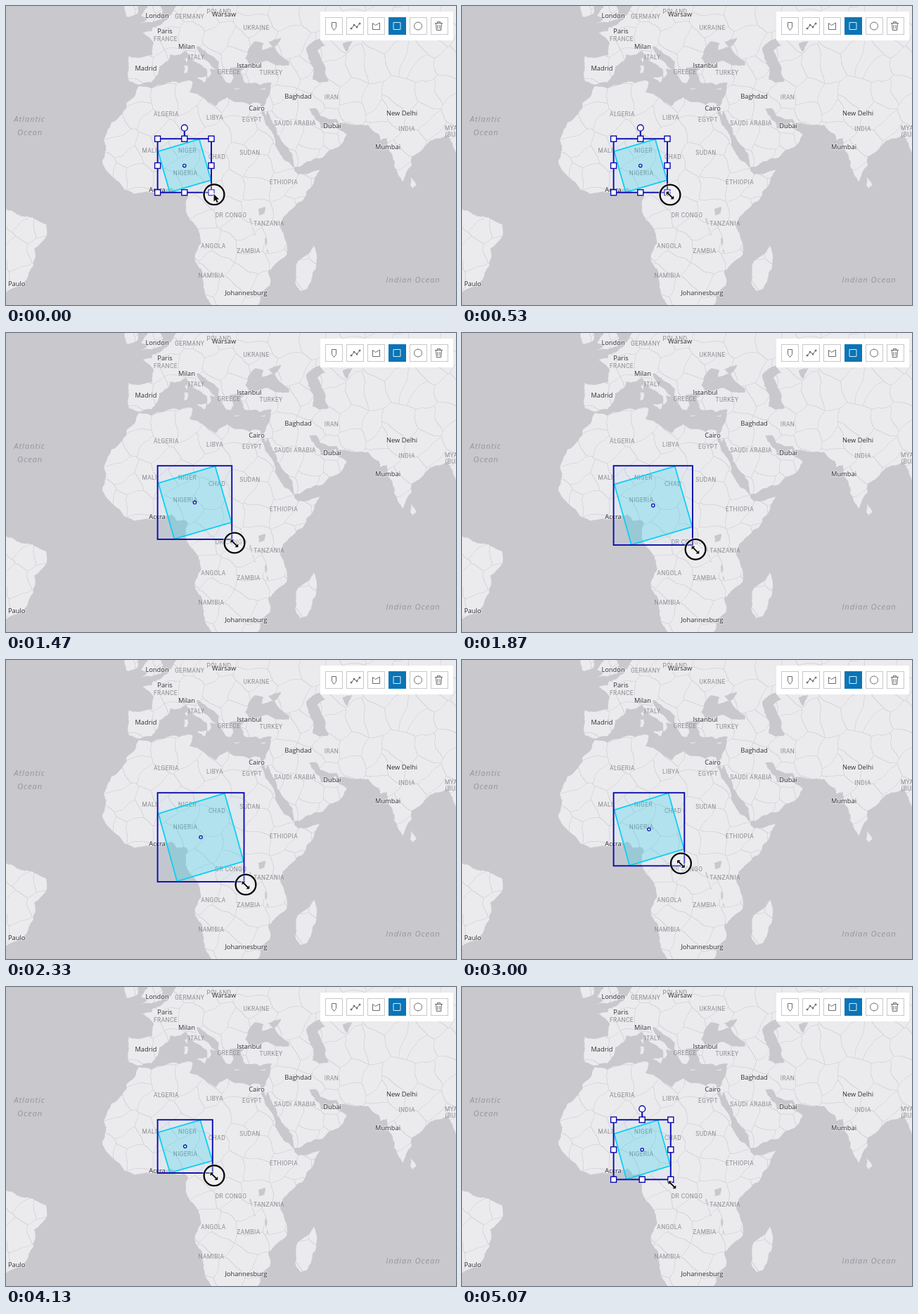
An HTML page with a canvas that plays this animation: 640x426 px, repeating every 5.14 s.

```html
<!DOCTYPE html>
<html lang="en">
<head>
<meta charset="utf-8">
<title>Resizing a shape on a map</title>
<style>
html, body { margin: 0; width: 640px; height: 426px; overflow: hidden; background: #c9c8cd; }
canvas { display: block; }
</style>
</head>
<body>
<canvas id="stage" width="640" height="426"></canvas>
<script>
const SEA = '#c9c8cd', LAND = '#ebeaed', BORDER = '#d9d8dc', BLUE = '#0b0baf';
const LOOP = 5140, STEP = 1000 / 15;

const stage = document.getElementById('stage').getContext('2d');
const base = document.createElement('canvas');
base.width = 640;
base.height = 426;
const map = base.getContext('2d');

const hash = n => {
  const s = Math.sin(n * 127.1 + 3) * 43758.5453;
  return s - Math.floor(s);
};
let seed = 0;
const random = () => hash(++seed);

// Web Mercator
const project = pair => {
  const [lon, lat] = pair.split(',').map(Number);
  return [215.5 + lon * 4.5, 287 - 257.8 * Math.log(Math.tan(Math.PI / 4 + lat * Math.PI / 360))];
};

// A line with a few seeded bends, like a coast
function coast([ax, ay], [bx, by]) {
  if (Math.hypot(bx - ax, by - ay) < 4) return map.lineTo(bx, by);
  const push = (random() - .5) * .22;
  const mid = [(ax + bx) / 2 + (by - ay) * push, (ay + by) / 2 - (bx - ax) * push];
  coast([ax, ay], mid);
  coast(mid, [bx, by]);
}
function area(outline, color = LAND) {
  const points = outline.trim().split(/\s+/).map(project);
  map.beginPath();
  points.forEach((p, i) => coast(p, points[(i + 1) % points.length]));
  map.fillStyle = color;
  map.fill();
}

function drawLand() {
  // Africa
  area(`-6,35.8 -2,35.2 4,36.8 10,37.3 11,37 10.2,34.2 15,32.4 18.5,30.5 20,32 22,32.9 25,31.6 29,30.9 31,31.5
    32.5,31.2 32.6,30 35.5,24 37.2,21 37.3,19 39.7,15.2 43.2,12.5 43.3,11.5 44.5,10.4 51.2,11.9 49,7 46,2.3
    42.5,-.5 40.2,-2.6 38.8,-6 40.6,-10.7 40.7,-15 35,-19.8 35.5,-24 32.8,-25.7 32.5,-28 30,-31 18,-31
    15,-26.5 14.4,-22.5 11.8,-16 13.8,-11 12.3,-6 8.9,-1 9.7,3.5 8.5,4.6 6,4.3 4.4,6.3 1,6 -2,4.8 -7.5,4.4
    -13,8.5 -16.7,12.5 -17.4,14.7 -16.2,19 -17,21 -14.5,26 -9.8,30 -9.8,31.4 -6.8,34`);
  area('49.3,-12 50.4,-15.7 47.2,-25 45,-25.5 43.5,-23 44.2,-17 47,-15');
  // Europe
  area(`-9.2,43.2 -9.4,38.7 -8.9,37 -6,36.2 -2,36.8 0,38.7 .5,40.7 3.2,42 4,43.5 7,43.5 9,44.4 10.4,43 12.3,41.7
    15.6,40 15.8,38 17,39 16.6,40.2 18.4,40 16,41.8 13.5,43.6 12.3,45.3 13.7,45.6 20,55 8.5,55 4.5,52.2
    1.5,50.2 -1.5,49.4 -1.8,48.6 -4.7,48.3 -1.2,46 -1.6,43.4`);
  area(`12,46 15,44.4 19.4,41.8 19.4,40 21.7,36.8 23.2,36.6 24,37.8 22.8,40.4 26,40.8 29,41.1 27.7,42.7
    28.8,44.8 31,46.5 33.5,46 33,44.6 36.5,45.3 35,46.3 39,47.2 37,45.2 41.5,42 41.5,41 50,38 60,38 60,56 12,56`);
  area('-5.5,50.1 1.3,51 1.7,52.7 0,56 -4,56 -3.1,53.4 -5.2,51.8 -3,51.4');
  area('-6.3,55 -6.3,52.2 -9.8,51.6 -10,55');
  // Asia
  area(`26.3,39.5 27.5,36.8 30.6,36.7 32.5,36.1 36,36.7 35,33 34.2,31.2 32.6,30 34.3,27.8 34.9,29.3 37.2,24.8
    39.2,20.5 42.7,16.5 43.3,12.7 45,12.8 52.2,15.6 57.5,19 59.8,22.4 56.6,24.5 56.3,26.2 54.5,24.2 51.6,24.3
    51.2,26 50,26.7 48,30 52,42 38,41 35,42 31,41.2 27.5,40.5`);
  area(`47,30 50,30 51.5,27.8 56.5,27 57.3,25.7 66.5,25.3 67.8,23.8 70,22.6 70.5,20.8 72.5,21.5 72.8,19 74.8,12.8
    77.5,8.1 80.2,13 80.3,15.8 86.5,20.8 91.8,22.5 94.3,17 99,16 99,56 46,56 46,38`);
  area('80,9.7 81.8,7 80.6,6 79.9,7');
  // South America
  area('-55,0 -48,-.5 -41,-2.9 -35.2,-5.3 -34.9,-8.5 -39,-13 -39.2,-18 -42,-22.8 -48.5,-26 -55,-30');
  // Mediterranean islands
  area('12.5,38 15.6,38.2 15.1,36.7');
  area('8.4,41 9.6,41 9.4,39.2 8.5,39');
  area('8.6,42.4 9.4,43 9.3,41.5');
  area('23.6,35.5 26.2,35.2 24.8,34.9');
  area('32.3,35 34.5,35.6 33.8,34.9');
}

// Countries: nearest-site cells around a jittered grid, slightly warped
function country(x, y) {
  const size = 34;
  const wx = x + 2 * Math.sin(y / 6) + Math.sin(x / 3), wy = y + 2 * Math.sin(x / 7);
  const col = Math.floor(wx / size), row = Math.floor(wy / size);
  let best = Infinity, id;
  for (let i = col - 1; i <= col + 1; i++)
    for (let j = row - 1; j <= row + 1; j++) {
      const n = i * 31 + j;
      const d = Math.hypot((i + hash(n)) * size - wx, (j + hash(n + 500)) * size - wy);
      if (d < best) [best, id] = [d, n];
    }
  return id;
}

function drawBorders() {
  map.globalCompositeOperation = 'source-atop';
  map.fillStyle = BORDER;
  let above = [];
  for (let y = 0; y < 426; y++) {
    const row = Array.from({ length: 640 }, (_, x) => country(x, y));
    for (let x = 1; x < 640; x++)
      if (row[x] !== row[x - 1] || (y && row[x] !== above[x])) map.fillRect(x, y, 1, 1);
    above = row;
  }
  map.globalCompositeOperation = 'source-over';
}

function drawWater() {
  area('47,45 51.5,47 53,45.5 50.5,44.3 52.8,41 54,37 51,36.7 49,37.5 49.3,40.3', SEA);
  area('58.5,46 61.5,46.5 60,44', SEA);
  area('31.8,-.5 34,.2 33.8,-2 32,-2.5', SEA);
  area('29,-3.4 29.5,-3.4 31.1,-8.7 30.6,-8.7', SEA);
  area('33.9,-9.7 34.4,-9.7 35.1,-14.2 34.6,-14', SEA);
  map.globalCompositeOperation = 'destination-over';
  map.fillStyle = SEA;
  map.fillRect(0, 0, 640, 426);
  map.globalCompositeOperation = 'source-over';
}

function labels(text, font, color, spacing, halo = 'transparent') {
  map.font = font;
  map.letterSpacing = spacing;
  map.textAlign = 'center';
  map.textBaseline = 'middle';
  map.lineWidth = 2;
  map.strokeStyle = halo;
  map.fillStyle = color;
  for (const item of text.split('|')) {
    const [name, x, y] = item.split(',');
    map.strokeText(name, x, y);
    map.fillText(name, x, y);
  }
}

function drawLabels() {
  const sans = '"Open Sans", "Noto Sans", sans-serif';
  labels(`GERMANY,261,16|POLAND,303,9|UKRAINE,356,32|FRANCE,227,48|ITALY,271,74|GREECE,317,95|TURKEY,377,96
|ALGERIA,228,155|LIBYA,297,160|EGYPT,350,163|IRAN,463,131|SAUDI ARABIA,411,168|INDIA,570,176|MALI,204,207
|NIGER,258,207|CHAD,300,216|SUDAN,347,210|NIGERIA,255,239|ETHIOPIA,395,252|DR CONGO,320,299|TANZANIA,374,311
|ANGOLA,295,343|ZAMBIA,345,350|NAMIBIA,292,385|MYANMAR,646,175|(BURMA),643,184`.replace(/\n/g, ''),
    '8.4px Roboto, ' + sans, '#8d8c91', '0.4px');
  labels(`London,215,14.5|Warsaw,310,12.5|Paris,226,36.5|Milan,257,58.5|Madrid,199,89.5|Istanbul,346,86|Cairo,356.5,147
|Baghdad,415.5,129.5|Dubai,464,171.5|New Delhi,563,154|Mumbai,543,202|Accra,215,263|Johannesburg,341.5,410
|São Paulo,6,397`.replace(/\n/g, ''),
    '9.3px ' + sans, '#2e2e30', '0px', 'rgba(240,239,242,.6)');
  labels('Atlantic,33.5,162|Ocean,34,181|Indian Ocean,579,391', 'italic 11.3px ' + sans, '#96959b', '0.9px');
}

function drawToolbar() {
  map.fillStyle = '#fff';
  map.fillRect(447, 8, 189, 41);
  map.lineWidth = 1;
  for (let i = 0; i < 6; i++) {
    const active = i === 3, x = 454 + i * 30;
    map.fillStyle = active ? '#0b74b5' : '#fff';
    map.strokeStyle = active ? '#0b74b5' : '#c8c8ca';
    map.fillRect(x, 16, 25, 25);
    map.strokeRect(x + .5, 16.5, 24, 24);
  }
  const icon = (d, color = '#6a6a6e') => {
    map.strokeStyle = color;
    map.stroke(new Path2D(d));
  };
  icon('M463.5 23.5h6v7l-3 4l-3-4z');
  icon('M491.5 32l3.5-5l4 3l4-5');
  map.fillStyle = '#6a6a6e';
  for (const [x, y] of [[491, 32], [495, 27], [499, 30], [503, 25]]) map.fillRect(x - 1.2, y - 1.2, 2.5, 2.5);
  icon('M521.5 24.5l4 3l6-3.5v9.5h-10z');
  icon('M551 23.5h10v10h-10z', '#d9ecf7');
  icon('M580.5 28.5a5.5 5.5 0 1 0 11 0a5.5 5.5 0 1 0 -11 0');
  icon('M610 24.5h11M613.5 24v-1.5h4v1.5M611.5 25l.8 9.5h6.4l.8-9.5M614 27v5.5M617 27v5.5');
}

const GRAB = 600, RELEASE = 4800;
// [time, x, y]: the hand eases from one rest to the next
const rests = [
  [0, 296, 268.7], [GRAB, 296, 269], [1000, 301, 278], [1470, 325, 299], [2330, 341, 320], [2600, 341, 320],
  [3260, 296, 274], [3700, 296, 268.7], [4250, 296, 268.7], [RELEASE, 299, 278], [5060, 299, 281], [LOOP, 299, 281]
];
function pointer(t) {
  const i = Math.max(1, rests.findIndex(r => r[0] >= t));
  const [t0, x0, y0] = rests[i - 1], [t1, x1, y1] = rests[i];
  const f = (t - t0) / (t1 - t0), s = f * f * (3 - 2 * f);
  return [x0 + (x1 - x0) * s, y0 + (y1 - y0) * s];
}

function corner(t) {
  if (t < GRAB) return [292, 265.7];
  const [x, y] = pointer(Math.min(t - 70, RELEASE)); // the box trails the pointer
  return [x - 2.2, y - 3.7];
}

function circle(x, y, r, fill, stroke, width) {
  stage.beginPath();
  stage.arc(x, y, r, 0, 2 * Math.PI);
  stage.fillStyle = fill;
  stage.fill();
  stage.strokeStyle = stroke;
  stage.lineWidth = width;
  stage.stroke();
}

function drawBox([right, bottom], handles) {
  const left = 215.6, top = 189.2, w = right - left, h = bottom - top;
  const cx = left + w / 2, cy = top + h / 2;
  stage.fillStyle = 'rgba(80,190,235,.06)';
  stage.fillRect(left, top, w, h);
  stage.beginPath();
  for (const [u, v] of [[.01, .235], [.775, .005], [.995, .77], [.225, .995]]) stage.lineTo(left + u * w, top + v * h);
  stage.closePath();
  stage.fillStyle = 'rgba(0,205,235,.21)';
  stage.fill();
  stage.strokeStyle = '#0bd0f5';
  stage.lineWidth = 1.8;
  stage.stroke();

  stage.strokeStyle = BLUE;
  stage.lineWidth = 1.9;
  stage.strokeRect(left, top, w, h);
  circle(cx, cy, 2.2, '#cfeaf4', BLUE, 1.2);
  if (!handles) return;
  stage.lineWidth = 2;
  stage.beginPath();
  stage.moveTo(cx, top);
  stage.lineTo(cx, top - 12);
  stage.stroke();
  circle(cx, top - 15.5, 4.4, '#fff', BLUE, 1.4);
  stage.fillStyle = '#fff';
  for (const x of [left, cx, right])
    for (const y of [top, cy, bottom]) {
      if (x === cx && y === cy) continue;
      stage.fillRect(x - 4, y - 4, 8, 8);
      stage.strokeRect(x - 4, y - 4, 8, 8);
    }
}

const arrow = new Path2D('M-.5 -2v11l2.6-2.4l1.8 4l1.8-.8l-1.8-3.9h3.4z');
const resize = new Path2D('M-5.5 -5.5h5l-1.8 1.8l5.8 5.8l1.8-1.8v5h-5l1.8-1.8l-5.8-5.8l-1.8 1.8z');

function drawPointer(t) {
  const [x, y] = pointer(t);
  if (t < RELEASE + 40) {
    circle(x, y, 14.5, 'rgba(255,255,255,.3)', 'rgba(255,255,255,.5)', 4);
    circle(x, y, 14.4, 'transparent', '#0a0a0a', 2.4);
  }
  stage.save();
  stage.translate(x, y + 1);
  const shape = t < GRAB / 2 ? arrow : resize;
  stage.strokeStyle = '#fff';
  stage.lineWidth = 1.6;
  stage.stroke(shape);
  stage.fillStyle = '#111';
  stage.fill(shape);
  stage.restore();
}

drawLand();
drawBorders();
drawWater();
drawLabels();
drawToolbar();

let start;
function frame(now) {
  start ??= now;
  const t = Math.floor(((now - start) % LOOP + 4) / STEP) * STEP;
  stage.drawImage(base, 0, 0);
  drawBox(corner(t), t < GRAB || t > RELEASE + 40);
  drawPointer(t);
  requestAnimationFrame(frame);
}
requestAnimationFrame(frame);
</script>
</body>
</html>
```
